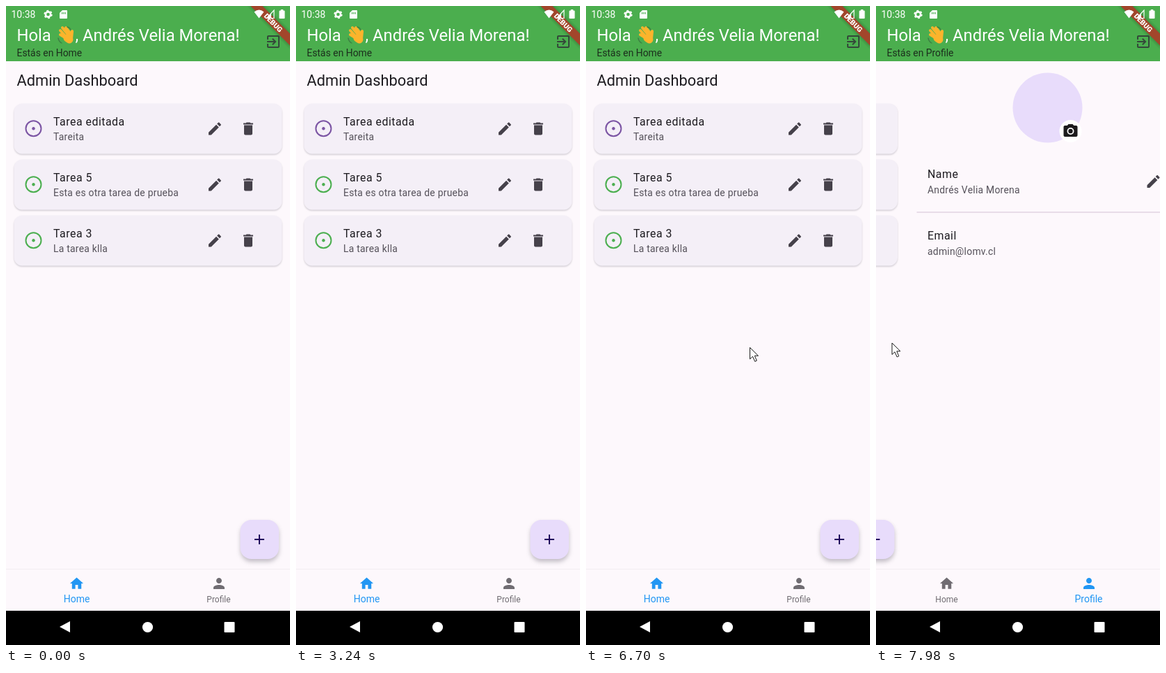
Animation of 408x914 px, one loop 8 s. Source, as an HTML page:

```html
<!DOCTYPE html>
<html lang="es">
<head>
<meta charset="utf-8">
<title>Admin Dashboard</title>
<style>
  html, body { margin: 0; width: 100%; height: 100%; overflow: hidden; background: #fdf8fc; }
  svg { display: block; width: 100vw; height: 100vh; }
  text { font-family: Roboto, Arial, sans-serif; white-space: pre; }
  .title { font-size: 15.9px; letter-spacing: .5px; fill: #1d1b20; }
  .sub { font-size: 13.9px; letter-spacing: .25px; fill: #55515a; }
  .head { font-size: 23.8px; fill: #fff; }
  .ico { fill: #45414a; }
</style>
</head>
<body>
<svg viewBox="0 0 408 914">
  <defs>
    <path id="edit" d="M3 17.25V21h3.75L17.81 9.94l-3.75-3.75L3 17.25zM20.71 7.04c.39-.39.39-1.02 0-1.41l-2.34-2.34c-.39-.39-1.02-.39-1.41 0l-1.83 1.83 3.75 3.75 1.83-1.83z"/>
    <path id="trash" d="M6 19c0 1.1.9 2 2 2h8c1.1 0 2-.9 2-2V7H6v12zM19 4h-3.5l-1-1h-5l-1 1H5v2h14V4z"/>
    <filter id="soft" x="-30%" y="-30%" width="160%" height="160%"><feGaussianBlur stdDeviation="3"/></filter>
    <filter id="edge" x="-5%" y="-10%" width="110%" height="125%"><feGaussianBlur stdDeviation=".8"/></filter>
  </defs>
  <rect width="408" height="914" fill="#fdf8fc"/>

  <g id="home">
    <text x="15.5" y="114" font-size="21.85" fill="#1d1b20">Admin Dashboard</text>
    <g id="cards"></g>
    <rect x="337" y="739" width="55" height="56" rx="16" fill="#a9a3ad" opacity=".7" filter="url(#soft)"/>
    <rect x="336.5" y="735" width="55.5" height="56" rx="16" fill="#e8dcfb"/>
    <path d="M357 763h14M364 756v14" stroke="#21005d" stroke-width="2"/>
  </g>

  <g id="profile">
    <circle cx="204" cy="145.5" r="50" fill="#e8dcfb"/>
    <circle cx="237" cy="179" r="16" fill="#fff"/>
    <g transform="translate(225 167)" fill="#1c1b1d">
      <path fill-rule="evenodd" d="M9 2L7.17 4H4c-1.1 0-2 .9-2 2v12c0 1.1.9 2 2 2h16c1.1 0 2-.9 2-2V6c0-1.1-.9-2-2-2h-3.17L15 2zM12 7a5 5 0 1 1 0 10a5 5 0 1 1 0-10z"/>
      <circle cx="12" cy="12" r="3.2"/>
    </g>
    <text class="title" x="31.5" y="246">Name</text>
    <text class="sub" x="31.5" y="268">Andrés Velia Morena</text>
    <use href="#edit" class="ico" x="344" y="239"/>
    <path d="M16 295H392" stroke="#e2d3e2" stroke-width="1.6"/>
    <text class="title" x="31.5" y="334">Email</text>
    <text class="sub" x="31.5" y="356">admin@lomv.cl</text>
  </g>

  <rect width="408" height="79" fill="#4bae4e"/>
  <text class="head" x="15.5" y="50">Hola</text>
  <g fill="none" stroke="#fbb42c" stroke-linecap="round">
    <path d="M87 45L78 35M90 42L81 31M93 40L86 31M88 47L78 41" stroke-width="4"/>
    <path d="M94 46L95 36" stroke-width="4.2"/>
    <path d="M88 46L91 48" stroke-width="11"/>
    <path d="M88 30q4 1 5 4M75 46q1 5 5 7" stroke="#3f7f45" stroke-width="1.3"/>
  </g>
  <text class="head" x="99.5" y="50">, Andrés Velia Morena!</text>
  <text id="where" x="15.5" y="72" font-size="13.9" fill="#1c2f1d"></text>
  <path transform="translate(372 39)" fill="#34483a" d="M10.09 15.59L11.5 17l5-5-5-5-1.41 1.41L12.67 11H3v2h9.67l-2.58 2.59zM19 3H5c-1.11 0-2 .9-2 2v4h2V5h14v14H5v-4H3v4c0 1.1.89 2 2 2h14c1.1 0 2-.9 2-2V5c0-1.1-.9-2-2-2z"/>

  <g transform="translate(408 0) rotate(45)">
    <rect x="-42" y="28" width="84" height="12" fill="#1f3f20" opacity=".5" filter="url(#soft)"/>
    <rect x="-42" y="28" width="84" height="12" fill="#a2462b"/>
    <text y="37.6" text-anchor="middle" font-size="10.2" font-weight="900" fill="#fff">DEBUG</text>
  </g>

  <g fill="#fff">
    <text x="7.5" y="17" font-size="14">10:38</text>
    <g fill="none" stroke="#fff">
      <circle cx="60.5" cy="12" r="3.6" stroke-width="2.6"/>
      <circle cx="60.5" cy="12" r="5.2" stroke-width="2" stroke-dasharray="2.7 2.745"/>
    </g>
    <path fill-rule="evenodd" d="M81 6h6q1 0 1 1v10q0 1-1 1h-9q-1 0-1-1v-7zM80 9v2.5h1.2V9zM82.3 9v2.5h1.2V9zM84.6 9v2.5h1.2V9z"/>
    <path d="M356.5 8.5Q363.5 2.5 370.5 8.5L363.5 17.5z"/>
    <path d="M385 6V17.5H374.5z" fill="none" stroke="#fff" stroke-width="1.2"/>
    <path d="M381 11V17.5H375z"/>
    <path d="M392.5 7.5q0-1 1-1h1.3V5h3.4v1.5h1.3q1 0 1 1v9.5q0 1-1 1h-6q-1 0-1-1z"/>
  </g>

  <rect y="805" width="408" height="60" fill="#fdf8fc"/>
  <path d="M0 805.5H408" stroke="#f2edf2"/>
  <g id="tab0" text-anchor="middle">
    <path transform="translate(90 814.5) scale(.96)" d="M10 20v-6h4v6h5v-8h3L12 3 2 12h3v8z"/>
    <text x="101.5" y="853">Home</text>
  </g>
  <g id="tab1" text-anchor="middle">
    <path transform="translate(294 814)" d="M12 12c2.21 0 4-1.79 4-4s-1.79-4-4-4-4 1.79-4 4 1.79 4 4 4zm0 2c-2.67 0-8 1.34-8 4v2h16v-2c0-2.66-5.33-4-8-4z"/>
    <text x="305.5" y="853">Profile</text>
  </g>

  <rect y="865" width="408" height="49"/>
  <g fill="#fff">
    <path d="M77 888L92 880V896z"/>
    <circle cx="203.5" cy="888.5" r="7.6"/>
    <rect x="313.5" y="881" width="15" height="15" rx="1"/>
  </g>

  <path id="cursor" d="M0 .5V17L4 13.3L7.2 20.5L9.8 19.3L6.8 12.3H12z" fill="#fff" stroke="#1a1a1a" stroke-linejoin="round"/>
</svg>

<script>
const LOOP = 8000, WIDTH = 408;
const ENTER = 6700, DRAG = 7203, DRAG_END = 7663, RELEASE = 7827;
const STALL = 7440, RESUME = 7540;
const PRESS_X = 322, END_X = 23, SLOP = 9;
const SPRING = 0.01414;
const BLUE = [33, 150, 243], GREY = [112, 108, 114];
const $ = id => document.getElementById(id);

const tasks = [
  ['Tarea editada', 'Tareita', '#7c55a4'],
  ['Tarea 5', 'Esta es otra tarea de prueba', '#4caf50'],
  ['Tarea 3', 'La tarea klla', '#4caf50'],
];
$('cards').innerHTML = tasks.map(([title, sub, color], i) => `
  <g transform="translate(0 ${i * 80})">
    <rect x="11.5" y="141" width="385" height="72" rx="12" fill="#d3ced5" filter="url(#edge)"/>
    <rect x="11.5" y="139.5" width="385" height="72" rx="12" fill="#f4eff7"/>
    <circle cx="39.5" cy="175.3" r="11" fill="none" stroke="${color}" stroke-width="2"/>
    <circle cx="39.5" cy="175.3" r="2.2" fill="${color}"/>
    <text class="title" x="68" y="171">${title}</text>
    <text class="sub" x="68" y="192">${sub}</text>
    <use href="#edit" class="ico" x="288" y="163.5"/>
    <use href="#trash" class="ico" x="336" y="163.5"/>
  </g>`).join('');

const mix = (a, b, k) => a + (b - a) * k;
const ease = k => k * k * (3 - 2 * k);
const span = (t, from, to) => Math.min(1, Math.max(0, (t - from) / (to - from)));
const blend = (a, b, k) => `rgb(${a.map((v, i) => Math.round(mix(v, b[i], k)))})`;

// Reach for the grab point, then swipe left.
function cursorX(t) {
  if (t < DRAG) return mix(235, PRESS_X, 1 - (1 - span(t, ENTER, 7050)) ** 2);
  return mix(PRESS_X, END_X, ease(span(t, DRAG, DRAG_END)));
}

// The page follows the finger, then a damped spring snaps it home.
function pageShift(t) {
  if (t < DRAG) return 0;
  const dragged = Math.max(0, PRESS_X - SLOP - cursorX(t));
  const x = SPRING * Math.max(0, t - RELEASE);
  return WIDTH - (WIDTH - dragged) * (1 + x) * Math.exp(-x);
}

function paintTab(id, k) {
  const [icon, label] = $(id).children;
  const color = blend(GREY, BLUE, k);
  icon.setAttribute('fill', color);
  label.setAttribute('fill', color);
  label.setAttribute('font-size', mix(12, 14, k));
}

function draw(t) {
  const shift = pageShift(t);
  $('home').setAttribute('transform', `translate(${-shift} 0)`);
  $('profile').setAttribute('transform', `translate(${WIDTH - shift} 0)`);
  $('where').textContent = 'Estás en ' + (shift > WIDTH / 2 ? 'Profile' : 'Home');

  const k = ease(span(t, 7540, 7740));
  paintTab('tab0', 1 - k);
  paintTab('tab1', k);

  const y = mix(488, 481.5, span(t, ENTER, STALL));
  $('cursor').setAttribute('transform', `translate(${cursorX(t)} ${y})`);
  $('cursor').setAttribute('visibility', t < ENTER ? 'hidden' : 'visible');
}

function tick() {
  const t = performance.now() % LOOP;
  draw(t > STALL && t < RESUME ? STALL : t);
  requestAnimationFrame(tick);
}
tick();
</script>
</body>
</html>
```
